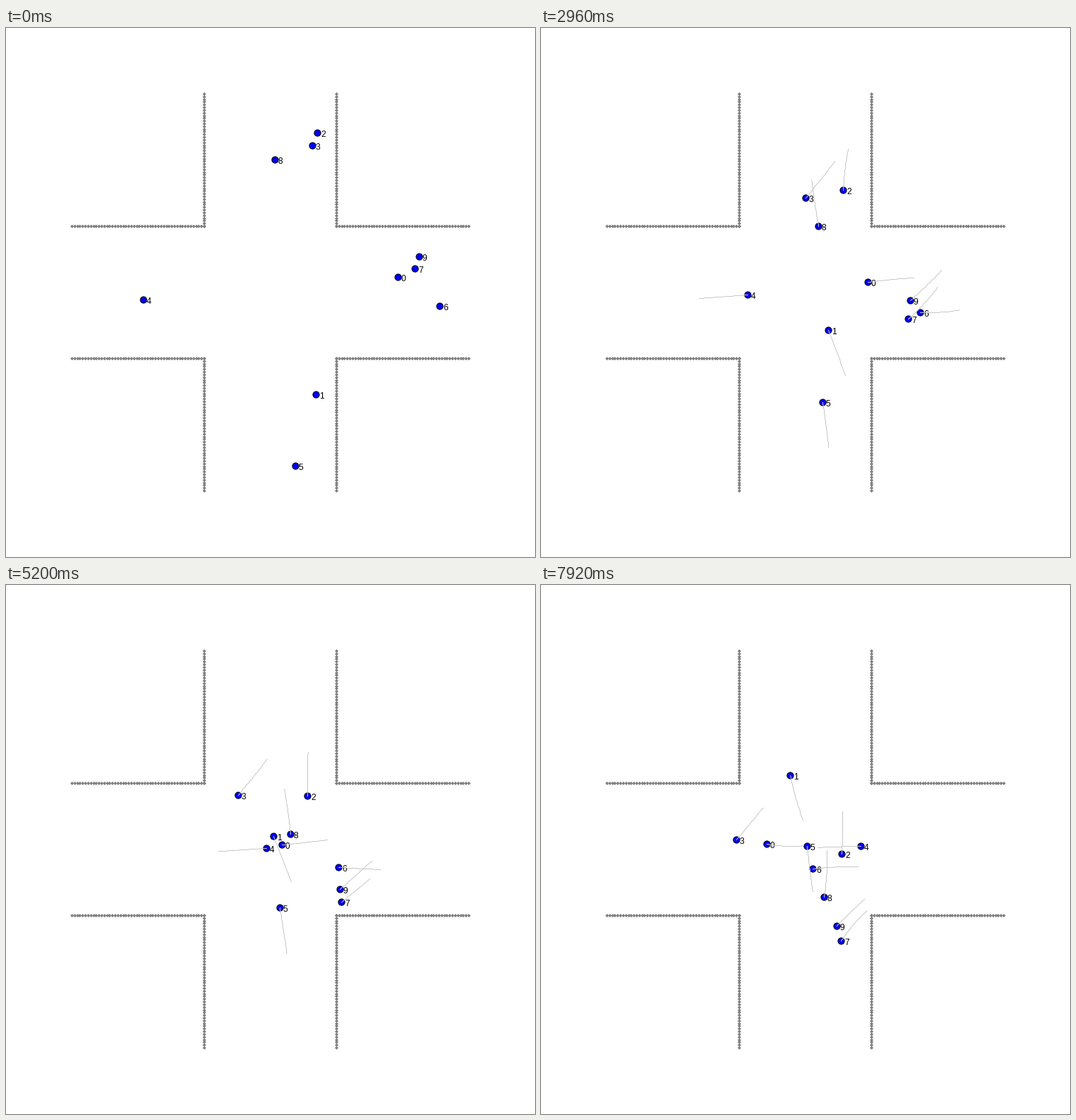
Animation of 748x748 px, one loop 8 s. Source, as a matplotlib script:

```python
import numpy as np
import matplotlib.pyplot as plt
from matplotlib.animation import FuncAnimation

SIZE, DPI = 748, 100
FRAMES, INTERVAL = 100, 80
TRAIL = 25    # frames of history shown behind each walker
RELAX = 1.25  # frames needed to reach walking speed
PIXEL = 72 / DPI

# Each walker: where it starts, two points on its way, where it ends
KEY_TIMES = [0, 37, 65, 99]
WALKERS = [
    [(554, 352), (462, 359), (390, 367), (319, 366)],
    [(438, 518), (406, 427), (378, 355), (352, 269)],
    [(440, 148), (427, 229), (426, 298), (425, 380)],
    [(433, 166), (374, 240), (328, 297), (276, 360)],
    [(194, 384), (292, 377), (368, 372), (452, 369)],
    [(409, 619), (398, 529), (387, 456), (376, 369)],
    [(613, 393), (536, 402), (470, 399), (384, 401)],
    [(578, 340), (519, 411), (474, 448), (424, 503)],
    [(380, 186), (392, 280), (402, 352), (400, 441)],
    [(584, 323), (522, 385), (472, 430), (418, 482)],
]


def pixel_path(points):
    """Cubic walk through the points, easing off from rest, in whole pixels."""
    frames = np.arange(FRAMES)
    walked = frames - RELAX * (1 - np.exp(-frames / RELAX))
    curves = np.polyfit(walked[KEY_TIMES], points, 3)
    return np.rint(np.stack([np.polyval(c, walked) for c in curves.T], axis=1))


fig = plt.figure(figsize=(SIZE / DPI, SIZE / DPI), dpi=DPI, facecolor="white")
ax = fig.add_axes([0, 0, 1, 1])
ax.set_xlim(-0.5, SIZE - 0.5)
ax.set_ylim(SIZE - 0.5, -0.5)
ax.axis("off")


def draw_walls():
    """Eight dotted walls around a crossing; one unit is a 20th of the stage."""
    for first in (2.5, 12.5):
        run = np.floor(np.linspace(first, first + 5, 50) * SIZE / 20)
        for side in (7.5, 12.5):
            edge = np.full_like(run, np.floor(side * SIZE / 20))
            for x, y in ((run, edge), (edge, run)):
                ax.plot(x, y, "D", ms=3.6 * PIXEL, mew=0, color="#808080")


def make_walker(k):
    body, = ax.plot([], [], "o", ms=9.2 * PIXEL, mew=PIXEL, mfc="blue",
                    mec="black", zorder=3 + 2 * k)
    label = ax.text(0, 0, str(k), family="Liberation Sans", size=12 * PIXEL,
                    va="baseline", zorder=4 + 2 * k)
    trail, = ax.plot([], [], color="#c8c8c8", lw=PIXEL, zorder=50)
    return body, label, trail


draw_walls()
paths = [pixel_path(points) for points in WALKERS]
walkers = [make_walker(k) for k in range(len(paths))]


def update(frame):
    for (body, label, trail), path in zip(walkers, paths):
        x, y = path[frame]
        body.set_data([x], [y])
        label.set_position((x + 4.5, y + 5.5))
        tail = path[max(0, frame - TRAIL):frame + 1]
        trail.set_data(*tail.T)
    return [part for walker in walkers for part in walker]


anim = FuncAnimation(fig, update, frames=FRAMES, interval=INTERVAL,
                     init_func=lambda: update(0), repeat=True, repeat_delay=0)
plt.show()
```
